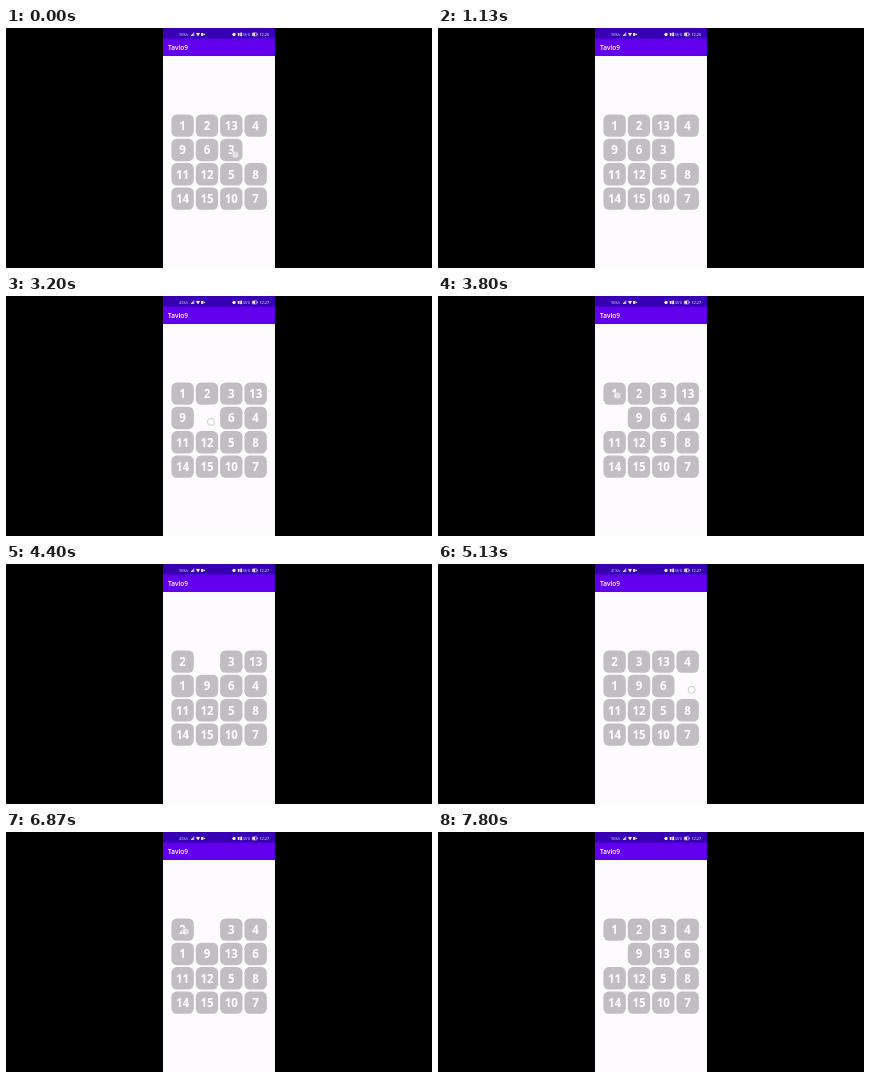
Recreate the animation shown at these times as an HTML page. Size 426 px wide and 240 px high, loop 7870 ms.

```html
<!DOCTYPE html>
<html lang="en">
<head>
<meta charset="utf-8">
<title>Sliding puzzle</title>
<style>
  html, body { margin: 0; width: 100%; height: 100%; overflow: hidden; background: #000; }
  svg { display: block; width: 100%; height: 100%; }
  text { fill: #fff; font-family: "Open Sans", "Noto Sans", sans-serif; }
  .tile rect { fill: #c0bec2; }
  .tile text { font-size: 11.5px; font-weight: 700; text-anchor: middle; }
  .title { font-size: 6.5px; font-weight: 600; }
  .status text { font-size: 3.9px; }
  .status text.rate { font-size: 3.1px; }
  .line { fill: none; stroke: #fff; stroke-width: .6; }
  .touch { fill: #fff; fill-opacity: .55; stroke: #c4c0c8; stroke-width: .8; }
</style>
</head>
<body>
<svg viewBox="0 0 426 240">
  <rect width="426" height="240" fill="#000"/>
  <rect x="157" width="112" height="240" fill="#fefbff"/>
  <rect x="157" width="112" height="11" fill="#3700b3"/>
  <rect x="157" y="10.5" width="112" height="17.5" fill="#6200ee"/>
  <g class="status" fill="#fff">
    <text class="rate" id="rate" x="173.2" y="7.8"></text>
    <path d="M185 8h.8V6.8h-.8zM186.2 8h.8V5.8h-.8zM187.4 8h.8V4.6h-.8z"/>
    <path d="M190 5.6Q192 3.8 194 5.6L192 8.2z"/>
    <rect x="195" y="5" width="2.5" height="2.8" rx=".6"/>
    <path d="M197.6 6.4l1.2-.9v1.8z"/>
    <circle cx="228" cy="6.4" r="1.6"/>
    <rect x="231.8" y="5" width="1.7" height="2.8"/>
    <rect x="234.3" y="4.6" width="1.8" height="3.6" rx=".4"/>
    <text class="rate" x="237.2" y="7.8">66 %</text>
    <rect class="line" x="246.3" y="4.9" width="4.6" height="3" rx=".6"/>
    <rect x="246.6" y="5.2" width="2.5" height="2.4"/>
    <rect x="251.2" y="5.8" width=".6" height="1.2"/>
    <text id="clock" x="253.2" y="7.9"></text>
  </g>
  <text class="title" x="162" y="22">Tavlo9</text>
  <g id="board"></g>
  <circle class="touch" id="touch" r="3.5"/>
</svg>
<script>
  const LOOP = 7870, PITCH = 24.35, SIZE = 22.4, LEFT = 165.4, TOP = 86.4;
  const NS = "http://www.w3.org/2000/svg";
  const start = [1, 2, 13, 4, 9, 6, 3, 0, 11, 12, 5, 8, 14, 15, 10, 7];

  // [time, tapped tile]: each tap slides the tile into the gap at once
  const taps = [
    [1330, 4], [1670, 13], [2070, 3], [3150, 6],
    [3530, 9], [3870, 1], [4200, 2],
    [4600, 3], [4870, 13], [5130, 4], [5470, 6], [5890, 13],
    [6530, 3], [6930, 2], [7330, 1]
  ];

  const byId = id => document.getElementById(id);
  const cellX = i => LEFT + (i % 4) * PITCH;
  const cellY = i => TOP + Math.floor(i / 4) * PITCH;

  function add(parent, name, attrs) {
    const el = document.createElementNS(NS, name);
    for (const key in attrs) el.setAttribute(key, attrs[key]);
    return parent.appendChild(el);
  }

  const tiles = [];
  for (let n = 1; n <= 15; n++) {
    const g = add(byId("board"), "g", { class: "tile" });
    add(g, "rect", { width: SIZE, height: SIZE, rx: 5.5 });
    add(g, "text", { x: SIZE / 2, y: 15.6 }).textContent = n;
    tiles[n] = g;
  }

  const boards = [start];
  const touches = [{ from: 0, to: 130, x: 229.3, y: 126.8 }];
  for (const [time, n] of taps) {
    const board = boards[boards.length - 1].slice();
    const cell = board.indexOf(n), gap = board.indexOf(0);
    board[gap] = n;
    board[cell] = 0;
    boards.push(board);
    const top = cell < 4;
    touches.push({
      from: time - 70, to: time + 90,
      x: cellX(cell) + SIZE / 2 + (top ? 3 : 4),
      y: cellY(cell) + SIZE / 2 + (top ? 2 : 4)
    });
  }

  function draw(t) {
    const board = boards[taps.filter(([time]) => time <= t).length];
    board.forEach((n, i) => {
      if (n) tiles[n].setAttribute("transform", `translate(${cellX(i)} ${cellY(i)})`);
    });
    const hit = touches.find(p => t >= p.from && t < p.to);
    const dot = byId("touch");
    dot.setAttribute("visibility", hit ? "visible" : "hidden");
    if (hit) {
      dot.setAttribute("cx", hit.x);
      dot.setAttribute("cy", hit.y);
    }
    byId("clock").textContent = t < 2670 ? "12:26" : "12:27";
    byId("rate").textContent = ["90 K/s", "41 K/s", "43 K/s"][Math.floor(t / 1200) % 3];
  }

  const origin = performance.now();
  function tick() {
    draw((performance.now() - origin) % LOOP);
    requestAnimationFrame(tick);
  }
  tick();
</script>
</body>
</html>
```
